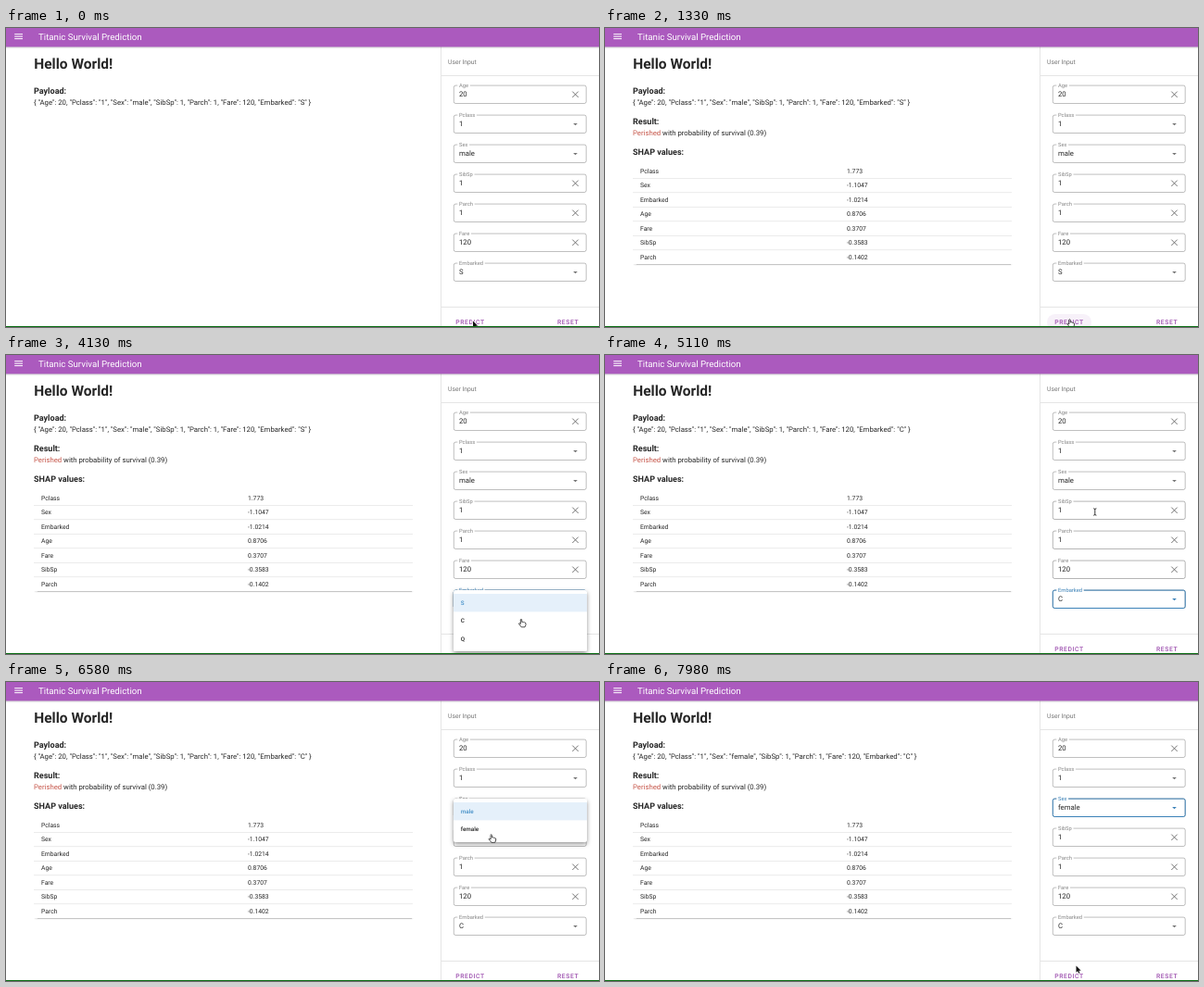
An HTML page with a canvas for the animation above (8000 ms loop, 640 px wide and 323 px high).

```html
<!DOCTYPE html>
<html lang="en">
<head>
<meta charset="utf-8">
<title>Survival Prediction</title>
<style>
  html, body { margin: 0; width: 100%; height: 100%; overflow: hidden; background: #fff; }
  canvas { display: block; width: 640px; height: 323px; }
</style>
</head>
<body>
<canvas id="stage"></canvas>
<script>
const W = 640, H = 323, LOOP = 8000, STEP = 70;
const canvas = document.getElementById('stage');
const dpr = window.devicePixelRatio || 1;
canvas.width = W * dpr;
canvas.height = H * dpr;
const ctx = canvas.getContext('2d');
ctx.textRendering = 'geometricPrecision';

const INK = '#262626', GREY = '#888', LINE = '#e5e5e5', PURPLE = '#9b4cad', BLUE = '#3c82b8';
const LEFT = 483, RIGHT = 626.5, FIELD_Y = 71.8, PITCH = 32, FIELD_H = 19.4, ITEM_H = 19.4;
const BUTTON = { x: 477, y: 309, w: 48, h: 17.4 };

const names = ['Age', 'Pclass', 'Sex', 'SibSp', 'Parch', 'Fare', 'Embarked'];
const isSelect = i => i === 1 || i === 2 || i === 6;
const shap = [
  ['Pclass', '1.773'], ['Sex', '-1.1047'], ['Embarked', '-1.0214'], ['Age', '0.8706'],
  ['Fare', '0.3707'], ['SibSp', '-0.3583'], ['Parch', '-0.1402']
];
const menus = [
  { field: 6, items: ['S', 'C', 'Q'], open: 2930, pick: 4410, choice: 1 },
  { field: 2, items: ['male', 'female'], open: 5850, pick: 6930, choice: 1 }
];
// Pointer keys: time, x, y
const path = [
  [0, 504, 316.5], [70, 501.5, 315], [1960, 501.5, 315], [2240, 553, 302], [2310, 553, 302],
  [2590, 557, 265.7], [3430, 557, 265.7], [4130, 556, 285.5], [4830, 556, 285.5], [5110, 528.8, 169.5],
  [5600, 525, 136], [6020, 525, 136], [6370, 523.5, 161], [6580, 523.7, 165], [7210, 523.7, 165],
  [7490, 513, 309], [7560, 513, 309], [7980, 508.5, 306.5]
];

const clamp = v => Math.max(0, Math.min(1, v));
const ramp = (t, a, b) => clamp((t - a) / (b - a));
const ease = p => p * p * (3 - 2 * p);

function pointer(t) {
  let k = 1;
  while (k < path.length - 1 && path[k][0] < t) k++;
  const [t0, x0, y0] = path[k - 1], [t1, x1, y1] = path[k];
  const p = ease(ramp(t, t0, t1));
  return { x: x0 + (x1 - x0) * p, y: y0 + (y1 - y0) * p };
}

const menuOpen = t => menus.some(m => t >= m.open && t < m.pick);

function fieldAt(t) {
  const { x, y } = pointer(t);
  if (menuOpen(t) || x < LEFT || x > RIGHT) return -1;
  const i = Math.round((y - FIELD_Y) / PITCH);
  return i >= 0 && i < 7 && Math.abs(y - FIELD_Y - i * PITCH) <= FIELD_H / 2 ? i : -1;
}

// Borders darken over a short trail of pointer positions
function hover(i, t) {
  let n = 0;
  for (let k = 0; k < 5; k++) if (fieldAt(t - k * 50) === i) n++;
  return n / 5;
}

function focus(i, t) {
  if (i === 6) return ramp(t, 3010, 3220) * (1 - ramp(t, 5850, 6000));
  return i === 2 ? ramp(t, 6930, 7330) : 0;
}

function text(s, x, y, size, color = INK, weight = 400, spacing = 0) {
  ctx.font = `${weight} ${size}px Roboto, Arial, sans-serif`;
  ctx.letterSpacing = spacing + 'px';
  ctx.fillStyle = color;
  ctx.fillText(s, x, y);
  return ctx.measureText(s).width;
}

function rect(x, y, w, h, color) {
  ctx.fillStyle = color;
  ctx.fillRect(x, y, w, h);
}

function round(x, y, w, h, r) {
  ctx.beginPath();
  ctx.roundRect(x, y, w, h, r);
}

function shape(points) {
  ctx.beginPath();
  points.forEach(([x, y]) => ctx.lineTo(x, y));
  ctx.closePath();
}

function raised(draw, dy, blur, color) {
  ctx.save();
  ctx.shadowColor = color;
  ctx.shadowBlur = blur * dpr;
  ctx.shadowOffsetY = dy * dpr;
  draw();
  ctx.restore();
}

function header() {
  raised(() => rect(-5, -5, W + 10, 25.4, '#ab5abe'), .5, 2, 'rgba(0,0,0,.25)');
  for (let k = 0; k < 3; k++) rect(9.2, 6.2 + k * 2.45, 8.8, 1, '#fff');
  text('Titanic Survival Prediction', 35, 12.5, 9.7, '#fff');
}

function report(t, values) {
  text('Hello World!', 30.2, 43.5, 15.5, INK, 700);
  text('Payload:', 30, 71.2, 9.06, INK, 700);
  const pairs = names.map((n, i) => {
    const v = values[i];
    return `"${n}": ${isSelect(i) ? `"${v}"` : v}`;
  });
  text(`{ ${pairs.join(', ')} }`, 30, 83, 7.74);
  if (t < 1050) return;

  text('Result:', 30, 104.4, 9.06, INK, 700);
  const w = text('Perished', 30, 116.2, 7.74, '#c6564a');
  text(' with probability of survival (0.39)', 30 + w, 116.2, 7.74);
  text('SHAP values:', 30, 137.3, 9.06, INK, 700);
  raised(() => rect(30.5, 252, 408, 3.4, '#fff'), .8, 1.6, 'rgba(0,0,0,.38)');
  rect(29, 246, 411, 9, '#fff');
  shap.forEach(([name, value], i) => {
    const y = 154.4 + i * 15.5;
    text(name, 38, y + 2.4, 6.78);
    text(value, 261, y + 2.4, 6.78);
    if (i < 6) rect(30, y + 7.6, 409, .6, '#dedede');
  });
}

function cross(x, y) {
  const r = 3.2;
  ctx.beginPath();
  ctx.moveTo(x - r, y - r); ctx.lineTo(x + r, y + r);
  ctx.moveTo(x + r, y - r); ctx.lineTo(x - r, y + r);
  ctx.strokeStyle = '#6c6c6c';
  ctx.lineWidth = .95;
  ctx.stroke();
}

function field(i, value, t) {
  const y = FIELD_Y + i * PITCH, top = y - FIELD_H / 2;
  const f = focus(i, t), h = hover(i, t);
  const accent = f > .3 ? BLUE : GREY;
  round(LEFT + .3, top, RIGHT - LEFT - .6, FIELD_H, 2);
  ctx.lineWidth = .7;
  ctx.strokeStyle = `rgba(0,0,0,${.36 + .28 * h})`;
  ctx.stroke();
  if (f) {
    ctx.save();
    ctx.globalAlpha = f;
    ctx.strokeStyle = BLUE;
    ctx.lineWidth = 1;
    ctx.stroke();
    ctx.restore();
  }
  ctx.font = '400 5.8px Roboto, Arial, sans-serif';
  ctx.letterSpacing = '0px';
  rect(487.3, top - 1, ctx.measureText(names[i]).width + 3.4, 2, '#fff');
  text(names[i], 489, top + 2.3, 5.8, accent);
  text(value, 489, y + 2.3, 7.74);
  if (isSelect(i)) {
    shape([[612.1, y - .9], [616.9, y - .9], [614.5, y + 1.5]]);
    ctx.fillStyle = f > .3 ? BLUE : '#757575';
    ctx.fill();
  } else cross(614.5, y);
}

function buttons(t) {
  const { x, y, w, h } = BUTTON;
  const over = ramp(t, 0, 210) * (1 - ramp(t, 2000, 2240));
  const press = ramp(t, 770, 910) * (1 - ramp(t, 980, 1190));
  if (over) {
    ctx.save();
    round(x, y, w, h, h / 2);
    ctx.clip();
    ctx.globalAlpha = .08 * over;
    rect(x, y, w, h, PURPLE);
    if (press) {
      ctx.globalAlpha = .18 * press;
      ctx.beginPath();
      ctx.arc(502, 317, 26 * ramp(t, 700, 910), 0, 7);
      ctx.fill();
    }
    ctx.restore();
  }
  text('PREDICT', 485.3, 320.1, 6.78, PURPLE, 500, .605);
  text('RESET', 595, 320.1, 6.78, PURPLE, 500, .605);
}

function sidebar(t, values) {
  rect(469, 20, 1, H, LINE);
  text('User Input', 477, 38.5, 6.78, '#757575');
  rect(470, 51, 170, 1, LINE);
  rect(470, 301, 170, 1, LINE);
  names.forEach((n, i) => field(i, values[i], t));
  buttons(t);
}

function menu(m, t) {
  const alpha = ramp(t, m.open, m.open + 270) * (1 - ramp(t, m.pick - 40, m.pick + 200));
  if (!alpha) return;
  const y = FIELD_Y + m.field * PITCH - 9.7, w = RIGHT - LEFT + .5;
  const h = m.items.length * ITEM_H + 7.8;
  const chosen = t >= m.pick ? m.choice : 0;
  const panel = () => { round(LEFT, y, w, h, 2); ctx.fillStyle = '#fff'; ctx.fill(); };
  ctx.save();
  ctx.globalAlpha = alpha;
  // Keep the shadow outside the panel so that it does not darken a fading menu
  ctx.save();
  ctx.beginPath();
  ctx.rect(0, 0, W, H);
  ctx.roundRect(LEFT, y, w, h, 2);
  ctx.clip('evenodd');
  raised(panel, 2.2, 5, 'rgba(0,0,0,.42)');
  ctx.restore();
  panel();
  m.items.forEach((s, k) => {
    const top = y + 3.9 + k * ITEM_H;
    if (k === chosen) rect(LEFT, top, w, ITEM_H, '#e5f0fa');
    text(s, 490.8, top + ITEM_H / 2 + 2.2, 6.3, k === chosen ? '#4590c8' : INK, 500);
  });
  ctx.restore();
}

function pointerKind(t, { x, y }) {
  if (menuOpen(t)) return 'hand';
  const i = fieldAt(t);
  if (i >= 0) return isSelect(i) ? 'hand' : 'beam';
  const onButton = y > BUTTON.y && x > BUTTON.x && x < BUTTON.x + BUTTON.w;
  return onButton && t >= 70 && t < 7000 ? 'hand' : 'arrow';
}

function cursor(t) {
  const p = pointer(t), kind = pointerKind(t, p);
  ctx.save();
  ctx.translate(p.x, p.y);
  ctx.lineJoin = 'round';
  if (kind === 'arrow') {
    shape([[0, 0], [0, 7.2], [1.7, 5.7], [2.8, 8.2], [4, 7.7], [2.9, 5.3], [5.2, 5.2]]);
    ctx.lineWidth = 1.2;
    ctx.strokeStyle = '#fff';
    ctx.stroke();
    ctx.fillStyle = '#111';
    ctx.fill();
  } else if (kind === 'hand') {
    shape([[-.7, .3], [0, -.3], [.7, .3], [.8, 3], [2, 2.8], [2.5, 3.2], [3.6, 3.2], [4, 3.7],
      [4.9, 4], [5, 6], [4, 8.4], [.2, 8.4], [-1.2, 6.5], [-2.7, 4.8], [-2.1, 4.1], [-.6, 5]]);
    ctx.fillStyle = '#fff';
    ctx.fill();
    ctx.lineWidth = .8;
    ctx.strokeStyle = '#222';
    ctx.stroke();
  } else {
    ctx.beginPath();
    ctx.moveTo(-1.6, -3.7); ctx.quadraticCurveTo(0, -3.7, 0, -2.6);
    ctx.lineTo(0, 2.6);
    ctx.quadraticCurveTo(0, 3.7, -1.6, 3.7);
    ctx.moveTo(1.6, -3.7); ctx.quadraticCurveTo(0, -3.7, 0, -2.6);
    ctx.moveTo(1.6, 3.7); ctx.quadraticCurveTo(0, 3.7, 0, 2.6);
    ctx.lineWidth = .9;
    ctx.strokeStyle = '#222';
    ctx.stroke();
  }
  ctx.restore();
}

function draw(t) {
  const values = ['20', '1', 'male', '1', '1', '120', 'S'];
  menus.forEach(m => { if (t >= m.pick) values[m.field] = m.items[m.choice]; });
  ctx.setTransform(dpr, 0, 0, dpr, 0, 0);
  rect(0, 0, W, H, '#fff');
  report(t, values);
  sidebar(t, values);
  header();
  menus.forEach(m => menu(m, t));
  cursor(t);
  rect(0, 322, W, 1, '#0d7016');
}

let start;
function tick(now) {
  start ??= now;
  const t = (now - start) % LOOP;
  draw(Math.floor(t / STEP) * STEP);
  requestAnimationFrame(tick);
}
draw(0);
requestAnimationFrame(tick);
</script>
</body>
</html>
```
